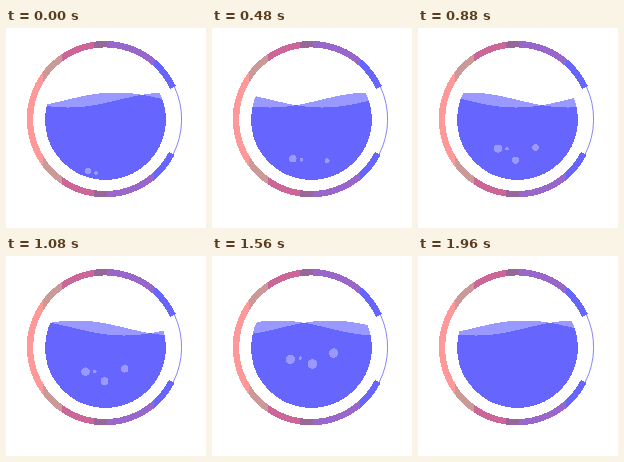
An HTML page that plays this animation: 200x200 px, repeating every 2 s.

```html
<!DOCTYPE html>
<html lang="en">
<head>
<meta charset="utf-8">
<title>Liquid gauge</title>
<style>
  html, body { margin: 0; width: 100%; height: 100%; overflow: hidden; background: #fff; }
  svg { display: block; width: 200px; height: 200px; }
</style>
</head>
<body>
<svg viewBox="0 0 200 200" fill="none" shape-rendering="crispEdges">
  <linearGradient id="bands" gradientUnits="userSpaceOnUse" x1="0" x2="200"></linearGradient>
  <path id="back" fill="#9999ff"/>
  <path id="front" fill="#6666ff"/>
  <g id="bubbles" fill="#fff"></g>
  <!-- White mask that leaves the round window open -->
  <circle cx="99.5" cy="91.5" r="85.3" stroke="#fff" stroke-width="50"/>
  <path id="ring" stroke="url(#bands)" stroke-width="6.4"/>
  <path id="thin" stroke="#6666ff" stroke-width="0.8" shape-rendering="auto"/>
</svg>
<script>
const LOOP = 2000, STEP = 40;
const $ = id => document.getElementById(id);

function add(parent, tag, attrs) {
  const el = document.createElementNS('http://www.w3.org/2000/svg', tag);
  for (const name in attrs) el.setAttribute(name, attrs[name]);
  return parent.appendChild(el);
}

// Ring colours, each with the x where its band begins
const bands = [[0, '#ff9999'], [37, '#cc9999'], [56, '#cc6699'], [88, '#996699'],
               [101, '#9966cc'], [148, '#6666ff'], [200, '#6666ff']];
bands.slice(1).forEach(([end, ], i) => {
  const [start, color] = bands[i];
  for (const x of [start, end]) add($('bands'), 'stop', { offset: x / 200, 'stop-color': color });
});

function arc(radius, start, end) {
  const at = deg => {
    const a = deg * Math.PI / 180;
    return `${99 + radius * Math.cos(a)} ${91.2 + radius * Math.sin(a)}`;
  };
  return `M${at(start)}A${radius} ${radius} 0 ${+(end - start > 180)} 1 ${at(end)}`;
}
$('ring').setAttribute('d', arc(75, 27, 335));
$('thin').setAttribute('d', arc(76.6, -25, 27));

// Start time, position at time zero, velocity, radius, growth (px and seconds)
const bubbles = [
  { from: 0,    x: 82,    y: 143,   vx: -2.3, vy: -25.4, r: 3.3, grow: 0.85 },
  { from: 0,    x: 89.9,  y: 145,   vx: -1,   vy: -27.5, r: 1.8, grow: 0 },
  { from: 0.14, x: 112.2, y: 148.5, vx: 6,    vy: -33,   r: 1.5, grow: 2.05 },
  { from: 0.54, x: 93.9,  y: 163.8, vx: 4.2,  vy: -35.8, r: 1.8, grow: 1.95 }
];
for (const b of bubbles) b.el = add($('bubbles'), 'circle', {});

const wave = (x, peak) => 72 - 7.5 * Math.cos((x - peak) * Math.PI / 100);

function below(surface) {
  let d = 'M36 156';
  for (let x = 36; x <= 164; x++) d += `L${x} ${surface(x).toFixed(2)}`;
  return d + 'L164 156Z';
}

function draw(t) {
  const shift = 100 * t;
  const a = x => wave(x, 162 + shift);
  const b = x => wave(x, 110 + shift);
  $('back').setAttribute('d', below(x => Math.min(a(x), b(x))));
  $('front').setAttribute('d', below(x => Math.max(a(x), b(x))));

  const fade = Math.max(0, Math.min(1, (1.92 - t) / 0.3));
  $('bubbles').setAttribute('fill-opacity', fade / 3);
  for (const { el, from, x, y, vx, vy, r, grow } of bubbles) {
    el.setAttribute('cx', x + vx * t);
    el.setAttribute('cy', y + vy * t);
    el.setAttribute('r', t < from ? 0 : r + grow * t);
  }
}

const begin = performance.now();
function tick() {
  const ms = (performance.now() - begin) % LOOP;
  draw(Math.floor(ms / STEP) * STEP / 1000);
  requestAnimationFrame(tick);
}
tick();
</script>
</body>
</html>
```
